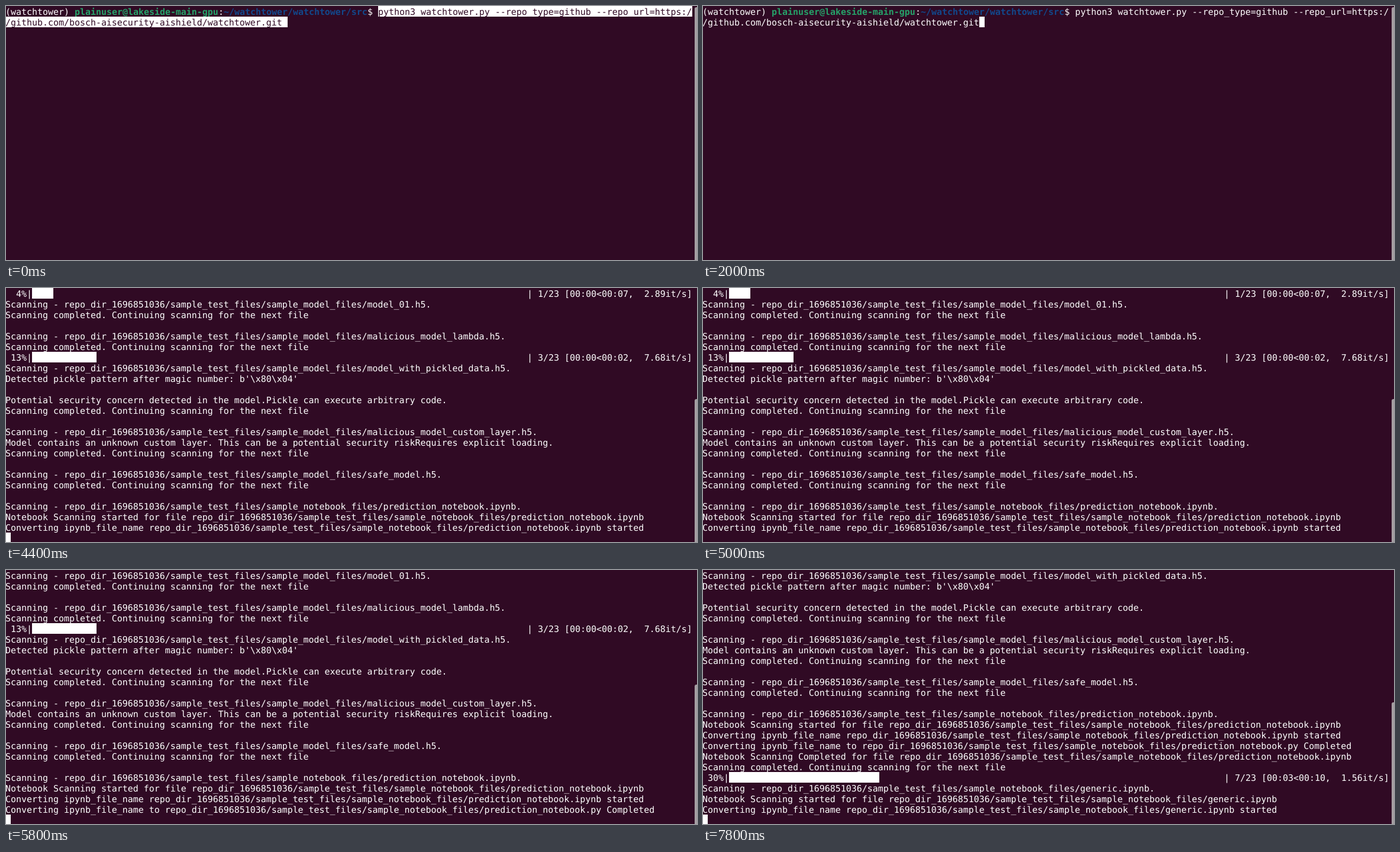
Recreate the animation shown at these times as an HTML page with a canvas. Size 1168 by 430 pixels, loop 8 s.

```html
<!DOCTYPE html>
<html lang="en">
<head>
<meta charset="utf-8">
<title>Terminal scan</title>
<style>
html, body { margin: 0; width: 100%; height: 100%; overflow: hidden; background: #300a24; }
canvas { display: block; }
</style>
</head>
<body>
<canvas id="stage" width="1168" height="430"></canvas>
<script>
const ctx = document.getElementById('stage').getContext('2d');
const LOOP = 8000, ROW = 18, COL = 9, LEFT = -1, BASE = 15;
const BG = '#300a24', FG = '#ffffff', GREEN = '#26a269', BLUE = '#12488b', THUMB = '#a49da1';
const FONT = '14.949px "DejaVu Sans Mono", monospace';

const UNSELECT = 600, ENTER = 3400;
const BLINKS = [1400, 2000, 2600, 3200, 3800, 4400, 5000, 5600, 6400, 6800, 7200, 7600];
// Each output step: start time, first visible log line, top of the scrollbar thumb
const SCROLLS = [[4400, 0, 188], [5400, 1, 194], [7600, 7, 224]];

const CMD = [
  'python3 watchtower.py --repo_type=github --repo_url=https:/',
  '/github.com/bosch-aisecurity-aishield/watchtower.git'
];
const PROMPT = [
  ['(watchtower) ', FG],
  ['plainuser@lakeside-main-gpu', GREEN, true],
  [':', FG],
  ['~/watchtower/watchtower/src', BLUE, true],
  ['$ ', FG]
];

const DIR = 'repo_dir_1696851036/sample_test_files/';
const BOOKS = DIR + 'sample_notebook_files/';
const DONE = 'Scanning completed. Continuing scanning for the next file';
const scan = path => `Scanning - ${path}.`;
const model = name => scan(`${DIR}sample_model_files/${name}.h5`);
const startBook = name => [
  scan(`${BOOKS}${name}.ipynb`),
  `Notebook Scanning started for file ${BOOKS}${name}.ipynb`,
  `Converting ipynb_file_name ${BOOKS}${name}.ipynb started`
];
const bar = (count, stats) => ({ count, stats });

const LOG = [
  bar(1, '[00:00<00:07,  2.89it/s]'),
  model('model_01'), DONE, '',
  model('malicious_model_lambda'), DONE,
  bar(3, '[00:00<00:02,  7.68it/s]'),
  model('model_with_pickled_data'),
  "Detected pickle pattern after magic number: b'\\x80\\x04'", '',
  'Potential security concern detected in the model.Pickle can execute arbitrary code.',
  DONE, '',
  model('malicious_model_custom_layer'),
  'Model contains an unknown custom layer. This can be a potential security riskRequires explicit loading.',
  DONE, '',
  model('safe_model'), DONE, '',
  ...startBook('prediction_notebook'),
  `Converting ipynb_file_name to ${BOOKS}prediction_notebook.py Completed`,
  `Notebook Scanning Completed for file ${BOOKS}prediction_notebook.ipynb`,
  DONE,
  bar(7, '[00:03<00:10,  1.56it/s]'),
  ...startBook('generic')
];

function text(str, col, row, color = FG, bold = false) {
  ctx.font = (bold ? 'bold ' : '') + FONT;
  ctx.fillStyle = color;
  ctx.fillText(str, LEFT + col * COL, row * ROW + BASE);
}

function cells(col, row, count) {
  ctx.fillStyle = FG;
  ctx.fillRect(LEFT + col * COL, row * ROW, Math.round(count * COL), ROW);
}

function thumb(y) {
  ctx.fillStyle = THUMB;
  ctx.beginPath();
  ctx.roundRect(1164, y, 8, 450, 3);
  ctx.fill();
}

function drawPrompt(selected) {
  let col = 0;
  for (const [str, color, bold] of PROMPT) {
    text(str, col, 0, color, bold);
    col += str.length;
  }
  if (selected) {
    cells(col, 0, CMD[0].length);
    cells(0, 1, CMD[1].length + 1);
  }
  const color = selected ? BG : FG;
  text(CMD[0], col, 0, color);
  text(CMD[1], 0, 1, color);
}

function drawBar({ count, stats }, row) {
  const done = count / 23;
  text(`${Math.round(done * 100)}%|`.padStart(5), 0, row);
  cells(5, row, Math.floor(done * 93 * 8) / 8);
  text(`| ${count}/23 ${stats}`, 98, row);
}

function drawLog(first) {
  LOG.slice(first, first + 23).forEach((line, row) => {
    if (line.stats) drawBar(line, row);
    else text(line, 0, row);
  });
}

function draw(t) {
  ctx.fillStyle = BG;
  ctx.fillRect(0, 0, 1168, 430);
  const cursorOn = BLINKS.filter(b => b <= t).length % 2 === 0;
  const step = SCROLLS.filter(s => s[0] <= t).pop();
  let cursor;
  if (step) {
    drawLog(step[1]);
    thumb(step[2]);
    cursor = [0, 23];
  } else {
    drawPrompt(t < UNSELECT);
    thumb(2);
    cursor = t < ENTER ? [CMD[1].length, 1] : [0, 2];
  }
  if (cursorOn) cells(...cursor, 1);
}

ctx.textRendering = 'geometricPrecision';
const start = performance.now();
function tick() {
  draw((performance.now() - start) % LOOP);
  requestAnimationFrame(tick);
}
tick();
</script>
</body>
</html>
```
